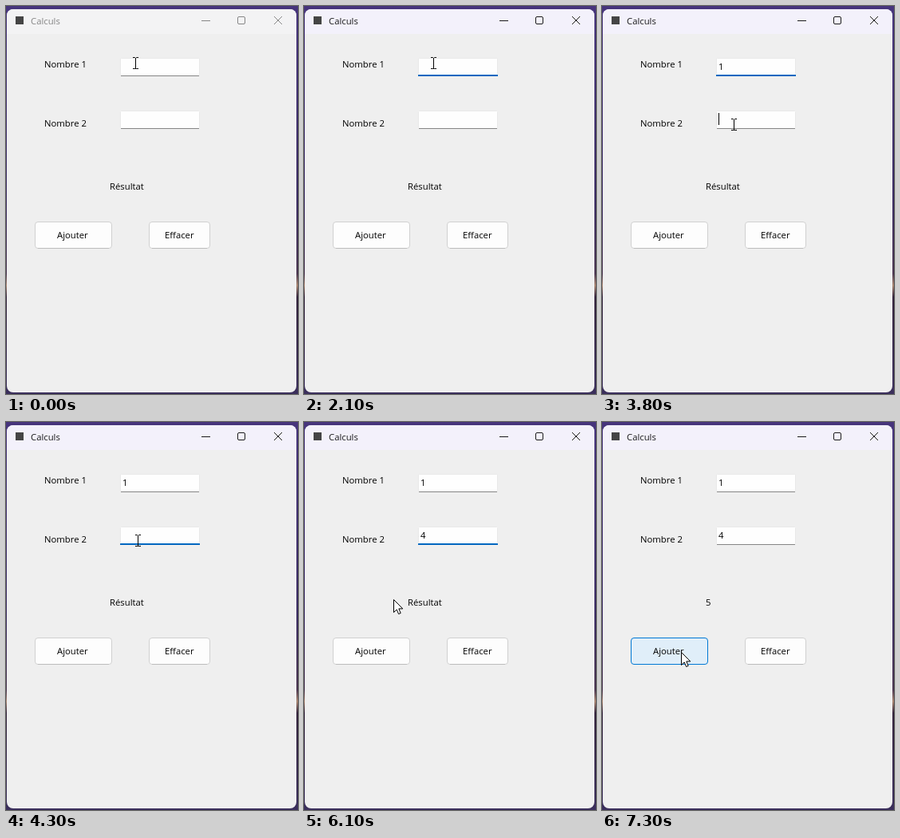
Recreate the animation shown at these times as an HTML page. Size 366x486 px, loop 8 s.

```html
<!DOCTYPE html>
<html lang="fr">
<head>
<meta charset="utf-8">
<title>Calculs</title>
<style>
html, body { margin: 0; width: 100%; height: 100%; overflow: hidden; background: #2b2148; }
svg { display: block; width: 366px; height: 486px; }
text { font: 11.3px "Open Sans", "Noto Sans", sans-serif; fill: #000; }

/* Every part shares the same 8 s clock. */
.anim { animation: 8s step-end infinite; }

.chrome { color: #868686; animation-name: chrome; }
.chrome text, .chrome .glyph { fill: currentColor; }
.chrome path, .chrome .box { fill: none; stroke: currentColor; }
@keyframes chrome { 6.25%, 100% { color: #1a1a1a; } }

.bar { fill: #f3f3f4; animation-name: bar; }
@keyframes bar { 6.25%, 100% { fill: #f3f1fb; } }

.field { fill: #fefefe; stroke: #e9e9e9; }
.line { fill: #858585; }
.focus { fill: #0067c0; opacity: 0; }
.focus1 { animation-name: focus1; }
.focus2 { animation-name: focus2; }
@keyframes focus1 {
  0% { opacity: 0; }
  5% { opacity: 0; animation-timing-function: steps(3); }
  8.75% { opacity: 1; }
  50% { opacity: 1; animation-timing-function: steps(3); }
  53.75%, 100% { opacity: 0; }
}
@keyframes focus2 {
  0% { opacity: 0; }
  50% { opacity: 0; animation-timing-function: steps(3); }
  53.75% { opacity: 1; }
  87.5% { opacity: 1; animation-timing-function: steps(3); }
  91.25%, 100% { opacity: 0; }
}

.caret { opacity: 0; }
.caret1 { animation-name: caret1; }
.caret1b { animation-name: caret1b; }
.caret2 { animation-name: caret2; }
.caret2b { animation-name: caret2b; }
@keyframes caret1 {
  0%, 13.75%, 25%, 100% { opacity: 0; }
  6.25%, 18.75% { opacity: 1; }
}
@keyframes caret1b {
  0%, 36.25%, 100% { opacity: 0; }
  30% { opacity: 1; }
}
@keyframes caret2 {
  0%, 53.75%, 100% { opacity: 0; }
  47.5% { opacity: 1; }
}
@keyframes caret2b {
  0%, 68.75%, 81.25%, 100% { opacity: 0; }
  58.75%, 77.5% { opacity: 1; }
}

.one, .four, .sum { opacity: 0; }
.one { animation-name: one; }
.four { animation-name: four; }
.sum { animation-name: sum; }
.label { animation-name: label; }
@keyframes one { 30%, 100% { opacity: 1; } }
@keyframes four { 58.75%, 100% { opacity: 1; } }
@keyframes sum { 88.75%, 100% { opacity: 1; } }
@keyframes label { 88.75%, 100% { opacity: 0; } }

.button { fill: #fdfdfd; stroke: #d0d0d0; }
.edge { stroke: #bdbdbd; }
.add { animation-name: add; }
@keyframes add {
  0% { fill: #fdfdfd; stroke: #d0d0d0; }
  77.5% { fill: #fdfdfd; stroke: #d0d0d0; }
  78.75% { fill: #e0eef9; stroke: #0078d4; }
  86.25% { fill: #cce4f7; stroke: #005499; }
  87.5% { fill: #cce4f7; stroke: #005499; animation-timing-function: steps(3); }
  91.25%, 100% { fill: #e0eef9; stroke: #0078d4; }
}
.add-edge { animation-name: add-edge; }
@keyframes add-edge { 78.75%, 100% { opacity: 0; } }

.mouse { animation-name: move; }
@keyframes move {
  0% { transform: translate(162px, 71px); }
  35% { transform: translate(162px, 71px); animation-timing-function: steps(8); }
  45% { transform: translate(166px, 147px); }
  47.5% { transform: translate(165px, 148px); }
  71.25% { transform: translate(165px, 148px); animation-timing-function: steps(4); }
  76.25% { transform: translate(112px, 222px); animation-timing-function: steps(2); }
  78.75%, 100% { transform: translate(99px, 288px); }
}
.beam { animation-name: beam; }
@keyframes beam {
  0%, 35%, 43.75%, 71.25% { opacity: 1; }
  30%, 37.5%, 58.75%, 72.5%, 100% { opacity: 0; }
}
.arrow { opacity: 0; animation-name: arrow; }
@keyframes arrow {
  0%, 43.75% { opacity: 0; }
  37.5%, 72.5%, 100% { opacity: 1; }
}
</style>
</head>
<body>
<svg viewBox="0 0 366 486">
  <defs>
    <linearGradient id="wall" x2="0" y2="1">
      <stop offset="0" stop-color="#47357c"/>
      <stop offset=".5" stop-color="#3a2b62"/>
      <stop offset=".69" stop-color="#4a3550"/>
      <stop offset=".72" stop-color="#a98570"/>
      <stop offset=".75" stop-color="#33233c"/>
      <stop offset="1" stop-color="#3b2f5c"/>
    </linearGradient>
    <clipPath id="frame"><rect x="1" y="4" width="363" height="480" rx="8"/></clipPath>
  </defs>

  <rect width="366" height="486" fill="url(#wall)"/>
  <g clip-path="url(#frame)">
    <rect width="366" height="486" fill="#efefef"/>
    <rect class="anim bar" width="366" height="35"/>
  </g>

  <rect x="12" y="13" width="10" height="10" fill="#454545"/>
  <g class="anim chrome">
    <text x="31" y="23">Calculs</text>
    <rect class="glyph" x="245" y="18" width="11" height="1"/>
    <rect class="box" x="290.5" y="13.5" width="9" height="9" rx="1.5"/>
    <path d="M336 13l10 10M346 13l-10 10"/>
  </g>

  <text x="48" y="77">Nombre 1</text>
  <text x="48" y="151">Nombre 2</text>
  <text class="anim label" x="130" y="230">Résultat</text>
  <text class="anim sum" x="130" y="230">5</text>

  <g>
    <rect class="field" x="143.5" y="65.5" width="99" height="22" rx="1"/>
    <rect class="line" x="144" y="87" width="98" height="1"/>
    <rect class="anim focus focus1" x="143" y="86" width="100" height="2" rx=".5"/>
    <text class="anim one" x="146" y="80">1</text>
    <rect class="anim caret caret1" x="146" y="68" width="1" height="15"/>
    <rect class="anim caret caret1b" x="152" y="68" width="1" height="15"/>
  </g>
  <g>
    <rect class="field" x="143.5" y="131.5" width="99" height="22" rx="1"/>
    <rect class="line" x="144" y="153" width="98" height="1"/>
    <rect class="anim focus focus2" x="143" y="152" width="100" height="2" rx=".5"/>
    <text class="anim four" x="146" y="146">4</text>
    <rect class="anim caret caret2" x="146" y="134" width="1" height="15"/>
    <rect class="anim caret caret2b" x="152" y="134" width="1" height="15"/>
  </g>

  <rect class="anim button add" x="36.5" y="270.5" width="96" height="33" rx="3.5"/>
  <path class="anim edge add-edge" d="M40 303.5h89"/>
  <text x="64" y="291">Ajouter</text>
  <rect class="button" x="179.5" y="270.5" width="76" height="33" rx="3.5"/>
  <path class="edge" d="M183 303.5h69"/>
  <text x="199" y="291">Effacer</text>

  <g class="anim mouse">
    <path class="anim beam" fill="none" stroke="#000"
      d="M-3 -6.5h2.5l1 1l1 -1h2.5M.5 -6v14M-3 7.5h2.5l1 -1l1 1h2.5"/>
    <path class="anim arrow" fill="#fff" stroke="#000" stroke-linejoin="round"
      d="M.5 .5v16l3.7-3.6l2.4 5.6l2.6-1.1l-2.4-5.5h5z"/>
  </g>
</svg>
</body>
</html>
```
